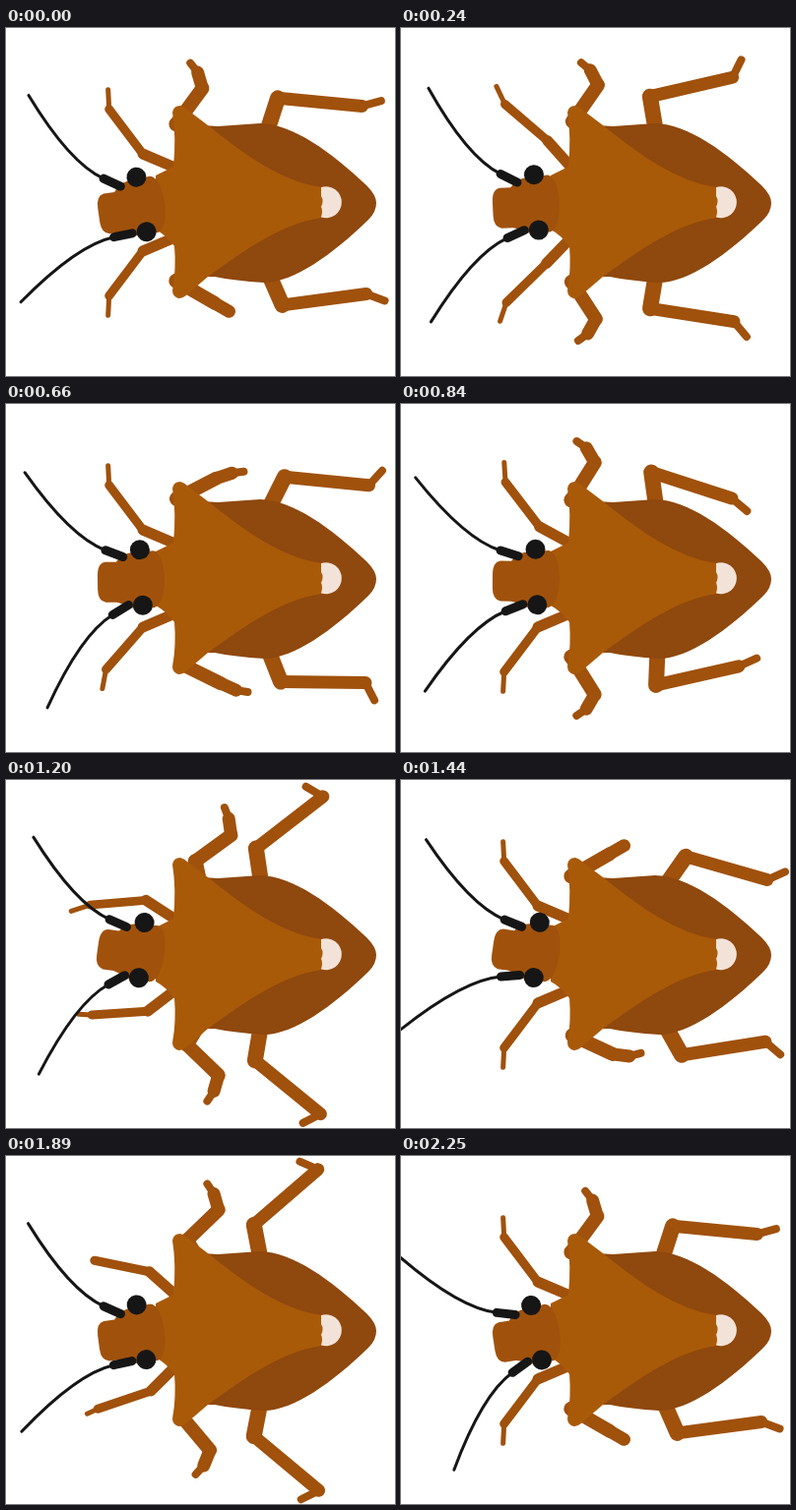
These frames come from a looping animation (395x354 px, 2.28 s). An HTML page with a canvas:

```html
<!DOCTYPE html>
<html lang="en">
<head>
<meta charset="utf-8">
<title>Walking shield bug</title>
<style>
html, body { margin: 0; width: 100%; height: 100%; overflow: hidden; background: #fff; }
canvas { display: block; }
</style>
</head>
<body>
<canvas id="stage" width="395" height="354"></canvas>
<script>
const ctx = document.getElementById('stage').getContext('2d');
const LOOP = 2280, STEP = 30, STRIDE = 750, MIRROR_Y = 355;
const COLOR = { leg: '#a0510c', shell: '#a95a09', head: '#a0520c', abdomen: '#8f480d', black: '#161616', spot: '#f2e2d7' };
const rad = degrees => degrees * Math.PI / 180;

// A leg is a jointed chain. Each pose gives the joint angles in degrees;
// ease is the power curve towards the next pose, arc an extra bend on the way.
const REST = [203, 233, 267];
const LEGS = [
  {
    base: [174, 143], lengths: [38, 57, 20], widths: [11, 9, 5], lag: 30,
    poses: [
      { at: 60, angles: REST, ease: 2, arc: [25, 0, 0] },
      { at: 480, angles: [208, 166, 145] },
      { at: 640, angles: REST }
    ]
  },
  {
    base: [198, 110], lengths: [28, 45, 17, 12], widths: [15, 14, 13, 8], lag: 60,
    poses: [
      { at: 30, angles: [206, -58, -120, -145], ease: 3 },
      { at: 480, angles: [270, -31, -93, -103] },
      { at: 630, angles: [212, -25, -7, 15] },
      { at: 690, angles: [206, -30, -30, -30], ease: 0.4 }
    ]
  },
  {
    base: [261, 118], lengths: [49, 86, 20], widths: [16, 13, 8], lag: 20,
    poses: [
      { at: 90, angles: [-98, 18, 40] },
      { at: 375, angles: [-101, -41, -157], ease: 2 },
      { at: 690, angles: [-55, 16, -24], arc: [0, -12, -18] }
    ]
  }
];

// Antenna angles relative to the head: upper, lower.
const ANTENNAE = [
  { at: 0, angles: [53, 23.5] },
  { at: 480, angles: [46, 60] },
  { at: 840, angles: [37, 42] },
  { at: 1200, angles: [36, 57] },
  { at: 1440, angles: [34, 33] },
  { at: 1890, angles: [52, 25] },
  { at: 2250, angles: [35.5, 47] }
];

function blend(poses, time, period) {
  const first = poses[0].at;
  const t = first + (((time - first) % period) + period) % period;
  const i = poses.findLastIndex(pose => pose.at <= t);
  const from = poses[i], to = poses[(i + 1) % poses.length];
  const end = to.at > from.at ? to.at : to.at + period;
  const u = (t - from.at) / (end - from.at);
  const mix = u ** (from.ease ?? 1);
  return from.angles.map((a, k) =>
    a + (to.angles[k] - a) * mix + (from.arc?.[k] ?? 0) * Math.sin(Math.PI * u));
}

function line(x1, y1, x2, y2, width) {
  ctx.lineWidth = width;
  ctx.beginPath();
  ctx.moveTo(x1, y1);
  ctx.lineTo(x2, y2);
  ctx.stroke();
}

function drawLeg({ base, lengths, widths, poses }, time) {
  const angles = blend(poses, time, STRIDE);
  const last = angles.length - 1;
  // The foot tip draws in when it lines up with the shin.
  const tipOut = Math.min(1, Math.abs(angles[last] - angles[last - 1]) / 10);
  let [x, y] = base;
  ctx.strokeStyle = COLOR.leg;
  angles.forEach((angle, i) => {
    const reach = lengths[i] * (i === last ? tipOut : 1);
    const nextX = x + reach * Math.cos(rad(angle));
    const nextY = y + reach * Math.sin(rad(angle));
    line(x, y, nextX, nextY, widths[i]);
    [x, y] = [nextX, nextY];
  });
}

function drawLegs(time) {
  LEGS.forEach(leg => drawLeg(leg, time));
  ctx.save();
  ctx.translate(0, MIRROR_Y);
  ctx.scale(1, -1);
  LEGS.forEach(leg => drawLeg(leg, time - leg.lag));
  ctx.restore();
}

function fill(path, color) {
  ctx.fillStyle = color;
  ctx.fill(path);
}

function disc(x, y, r, color) {
  ctx.fillStyle = color;
  ctx.beginPath();
  ctx.arc(x, y, r, 0, 2 * Math.PI);
  ctx.fill();
}

const abdomen = new Path2D('M200 99 L215 100 L258 97 C292 98 330 126 366 160 Q376 170 376 178 Q376 187 368 195 C332 230 292 259 262 259 Q232 257 212 253 L200 253Z');
const shell = new Path2D('M169 86 Q170 79 177 79 Q181 80 184 83 L205 99 C240 127 280 157 321 162 L321 193 C280 198 240 228 205 253 L184 271 Q180 275 175 275 Q169 273 169 267 Q173 245 171 222 Q163 211 152 205 L152 150 L170 141 Q173 110 169 86Z');
const spot = new Path2D('M320 162 A16 16 0 1 1 320 192.5 Q322 186 320 182 Q323 176 320 171Z');
const head = new Path2D('M101 160 L112 160 Q118 152 126 151 L150 149 Q160 151 161 178 Q160 204 150 207 L126 207 Q118 202 112 201 L101 201 Q93 199 93 188 L93 174 Q93 161 101 160Z');

// Drawn in head space; side is -1 for the upper antenna, 1 for the lower.
function antenna(x, y, angle, length, side) {
  const point = (degrees, r) => [x - r * Math.cos(rad(degrees)), y + side * r * Math.sin(rad(degrees))];
  const root = angle - 20;
  const joint = point(root, 19);
  ctx.strokeStyle = COLOR.black;
  line(x, y, ...joint, 9);
  ctx.lineWidth = 3;
  ctx.beginPath();
  ctx.moveTo(...joint);
  ctx.quadraticCurveTo(...point(root, 57), ...point(angle, length));
  ctx.stroke();
}

function drawHead(time) {
  const turn = 2 * Math.PI * time / LOOP;
  const tilt = -7.5 * Math.cos(turn) + 4 * Math.sin(2 * turn) - 0.7;
  const [upper, lower] = blend(ANTENNAE, time, LOOP);
  ctx.save();
  ctx.translate(160, 177);
  ctx.rotate(rad(tilt));
  ctx.translate(-160, -177);
  fill(head, COLOR.head);
  antenna(119, 155, upper, 131.5, -1);
  antenna(124, 204, lower, 133, 1);
  disc(136.3, 148, 10, COLOR.black);
  disc(138.5, 204.5, 10, COLOR.black);
  ctx.restore();
}

function draw(now) {
  const time = Math.floor((now % LOOP) / STEP) * STEP;
  ctx.fillStyle = '#fff';
  ctx.fillRect(0, 0, 395, 354);
  ctx.lineCap = ctx.lineJoin = 'round';
  drawLegs(time);
  fill(abdomen, COLOR.abdomen);
  fill(shell, COLOR.shell);
  fill(spot, COLOR.spot);
  drawHead(time);
}

let start;
function tick(now) {
  start ??= now;
  draw(now - start);
  requestAnimationFrame(tick);
}
draw(0);
requestAnimationFrame(tick);
</script>
</body>
</html>
```
